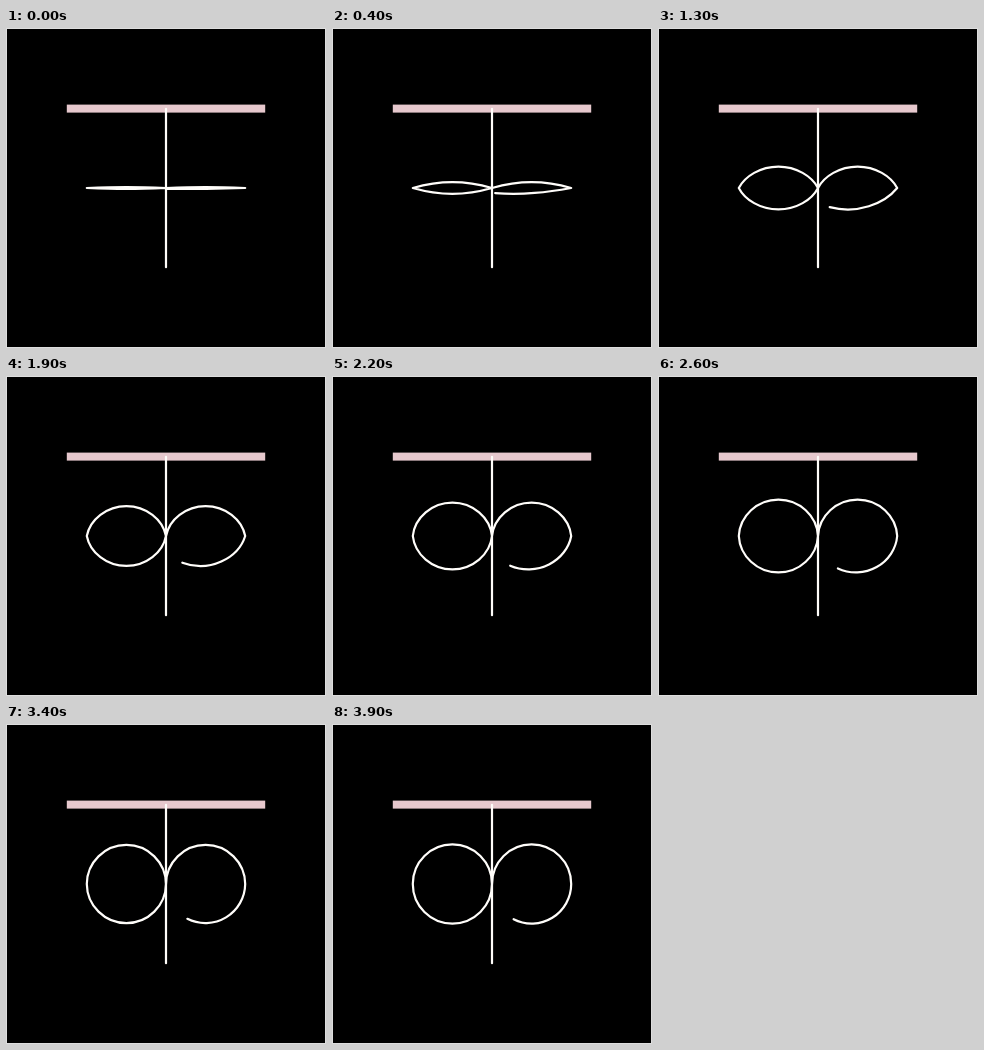
An HTML page that plays this animation: 320 px wide and 320 px high, repeating every 4 s.

```html
<!DOCTYPE html>
<html lang="en">
<head>
<meta charset="utf-8">
<title>Letter strokes</title>
<style>
  html, body { margin: 0; width: 100%; height: 100%; overflow: hidden; background: #000; }
  svg { display: block; width: 100vw; height: 100vh; }
  .stroke { fill: none; stroke: #fffdfa; stroke-width: 2.2; stroke-linecap: round; stroke-linejoin: round; }
</style>
</head>
<body>
<svg viewBox="0 0 320 320">
  <rect x=".5" y=".5" width="319" height="319" fill="#000" stroke="#ddd"/>
  <rect x="60.8" y="76.6" width="198.4" height="8" fill="#e6c8cd"/>
  <path class="stroke" d="M160 80.8V239.2"/>
  <path class="stroke" id="loops"/>
</svg>
<script>
const LOOP = 4000, TICK = 100, STEP = 600;
const R = 39.6, MID = 160;
// Openness of the loops, one value per STEP
const OPEN = [0.025, 0.218, 0.5, 0.725, 0.887, 0.962, 0.995, 1, 1];
const loops = document.getElementById('loops');

const lerp = (a, b, p) => a + (b - a) * p;

// Cubic control points of a circular arc, angles in degrees
function arc(cx, from, to) {
  const a = from * Math.PI / 180, b = to * Math.PI / 180;
  const k = 4 / 3 * Math.tan((b - a) / 4);
  const at = (t, h) => [
    cx + R * (Math.cos(t) - h * Math.sin(t)),
    MID + R * (Math.sin(t) + h * Math.cos(t))
  ];
  return [at(a, 0), at(a, k), at(b, -k), at(b, 0)];
}

// Each segment morphs from a flat line into its arc
function chain(cx, angles, xs) {
  return angles.slice(1).map((to, i) => ({
    round: arc(cx, angles[i], to),
    flat: [0, 1, 2, 3].map(n => [MID + R * lerp(xs[i], xs[i + 1], n / 3), MID])
  }));
}

const chains = [
  chain(MID - R, [0, -90, -180, -270, -360], [0, -1, -2, -1, 0]),
  chain(MID + R, [180, 270, 360, 418.5, 477], [0, 1, 2, 1, 0])
];

function openness(t) {
  const i = Math.floor(t / STEP), h = t / STEP - i;
  const v = n => OPEN[Math.max(0, Math.min(n, OPEN.length - 1))];
  const a = v(i), b = v(i + 1);
  const m0 = i ? (b - v(i - 1)) / 2 : b - a;
  const m1 = (v(i + 2) - a) / 2;
  return a + h * (m0 + h * (3 * (b - a) - 2 * m0 - m1 + h * (2 * (a - b) + m0 + m1)));
}

function shape(p) {
  return chains.map(segs => segs.map((s, i) => {
    const pts = s.round.map((q, n) =>
      q.map((c, k) => lerp(s.flat[n][k], c, p).toFixed(2)).join(' '));
    return (i ? '' : 'M' + pts[0]) + 'C' + pts.slice(1).join(' ');
  }).join('')).join('');
}

function draw(now) {
  const t = Math.floor((now % LOOP) / TICK) * TICK;
  loops.setAttribute('d', shape(openness(t)));
}

const start = performance.now();
function frame() {
  draw(Math.max(0, performance.now() - start));
  requestAnimationFrame(frame);
}
frame();
</script>
</body>
</html>
```
